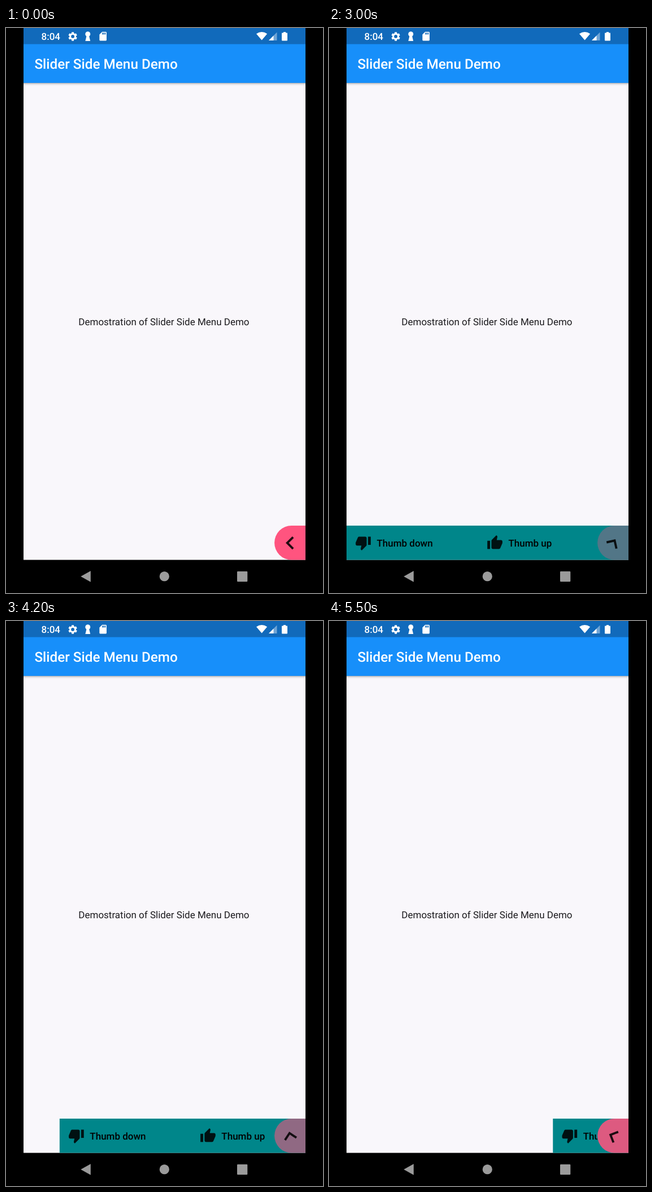
Write an HTML page that moves like this. It is 561 by 998 pixels and loops after 5.6 s.

```html
<!DOCTYPE html>
<html lang="en">
<head>
<meta charset="utf-8">
<title>Slider Side Menu Demo</title>
<style>
  html, body { margin: 0; width: 100%; height: 100%; overflow: hidden; background: #000; }
  svg { display: block; width: 100vw; height: 100vh; }
  text { font-family: Roboto, sans-serif; font-size: 17px; text-rendering: geometricPrecision; white-space: pre; }
  .medium { font-weight: 500; }
</style>
</head>
<body>
<svg viewBox="0 0 561 998">
  <defs>
    <linearGradient id="shade" x2="0" y2="1">
      <stop offset="0" stop-opacity=".3"/>
      <stop offset=".4" stop-opacity=".1"/>
      <stop offset="1" stop-opacity="0"/>
    </linearGradient>
    <clipPath id="items"><path d="M31 879H475V940H31z"/></clipPath>
  </defs>

  <rect width="561" height="998"/>
  <rect x="31" y="96" width="499" height="843.5" fill="#f9f7fb"/>
  <rect x="31" y="97" width="499" height="5" fill="url(#shade)"/>
  <rect x="31" y="28" width="499" height="69" fill="#178ffa"/>
  <rect x="31" width="499" height="28.5" fill="#116abb"/>

  <g fill="#fff">
    <text class="medium" x="62.5" y="21">8:04</text>
    <path id="gear" fill-rule="evenodd" transform="translate(108.4 5.2) scale(.81)" d="M19.14 12.94c.04-.3.06-.61.06-.94s-.02-.64-.07-.94l2.03-1.58a.5.5 0 0 0 .12-.61l-1.92-3.32a.5.5 0 0 0-.59-.22l-2.39.96a7 7 0 0 0-1.62-.94l-.36-2.54A.5.5 0 0 0 13.92 2.4h-3.84a.5.5 0 0 0-.47.41l-.36 2.54a7 7 0 0 0-1.62.94l-2.39-.96a.5.5 0 0 0-.59.22L2.74 8.87a.5.5 0 0 0 .12.61l2.03 1.58a6 6 0 0 0 0 1.88l-2.03 1.58a.5.5 0 0 0-.12.61l1.92 3.32c.12.22.37.29.59.22l2.39-.96c.5.38 1.03.7 1.62.94l.36 2.54c.05.24.24.41.48.41h3.84c.24 0 .44-.17.47-.41l.36-2.54a7 7 0 0 0 1.62-.94l2.39.96c.22.08.47 0 .59-.22l1.92-3.32a.5.5 0 0 0-.12-.61zM12 15.6a3.6 3.6 0 1 1 0-7.2 3.6 3.6 0 0 1 0 7.2z"/>
    <circle cx="144.8" cy="10.7" r="4.5"/>
    <path d="M142.8 13H146.8L149.2 23H140.4z"/>
    <path fill-rule="evenodd" transform="translate(162.2 5.2) scale(.79)" d="M18 2h-8L4.02 8 4 20c0 1.1.9 2 2 2h12c1.1 0 2-.9 2-2V4c0-1.1-.9-2-2-2zm-6 6h-2V4h2zm3 0h-2V4h2zm3 0h-2V4h2z"/>
    <path d="M452.6 21.5L443 10.2Q452.6 3.6 462.2 10.2z"/>
    <path d="M479.5 7.5V22H465z" opacity=".4"/>
    <path d="M473.5 13.5V22H465z"/>
    <path d="M491 7h4v1.6h2q1 0 1 1V21.4q0 1-1 1h-8q-1 0-1-1V9.6q0-1 1-1h2z"/>
    <text class="medium" x="50.4" y="72" style="font-size:24.3px">Slider Side Menu Demo</text>
  </g>

  <text x="128.3" y="525" fill="#1c1b1e">Demostration of Slider Side Menu Demo</text>

  <rect id="panel" y="879" height="60.5" fill="#00868a"/>
  <g clip-path="url(#items)">
    <g id="row">
      <path fill-opacity=".87" transform="translate(15 894.8) scale(1.213)" d="M15 3H6c-.83 0-1.54.5-1.84 1.22l-3.02 7.05c-.09.23-.14.47-.14.73v2c0 1.1.9 2 2 2h6.31l-.95 4.57-.03.32c0 .41.17.79.44 1.06L9.83 23l6.59-6.59c.36-.36.58-.86.58-1.41V5c0-1.1-.9-2-2-2zm4 0v12h4V3z"/>
      <text class="medium" x="53.5" y="915.6">Thumb down</text>
      <path fill-opacity=".87" transform="translate(248 894.8) scale(1.213)" d="M1 21h4V9H1zM23 10c0-1.1-.9-2-2-2h-6.31l.95-4.57.03-.32c0-.41-.17-.79-.44-1.06L14.17 1 7.59 7.59C7.22 7.95 7 8.45 7 9v10c0 1.1.9 2 2 2h9c.83 0 1.54-.5 1.84-1.22l3.02-7.05c.09-.23.14-.47.14-.73z"/>
      <text class="medium" x="286.5" y="915.6">Thumb up</text>
    </g>
  </g>
  <path id="button" fill="#ff547f" d="M530 879H505.3a30.25 30.25 0 0 0 0 60.5H530z"/>
  <path id="arrow" fill-opacity=".87" d="M3.41 -4.59L2 -6L-4 0L2 6L3.41 4.59L-1.17 0z"/>

  <g fill="#9b9b9b">
    <path d="M132.3 968.7L149.8 959V978.5z"/>
    <circle cx="280.3" cy="968.7" r="8.6"/>
    <rect x="409" y="959.7" width="18.3" height="18.3" rx="1.2"/>
  </g>
</svg>
<script>
  const LOOP = 5600, STEP = 100, SLIDE = 500;
  const LEFT = 31, RIGHT = 530;
  const FULL = 998; // wider than the screen, so the panel fills it halfway through
  const taps = [[1700, true], [2840, false], [3982, true], [5067, false]];
  const [panel, row, button, arrow] =
    ["panel", "row", "button", "arrow"].map(id => document.getElementById(id));

  function openness(time) {
    let value = 0;
    for (const [start, opening] of taps) {
      if (time < start) break;
      const p = Math.min(1, (time - start) / SLIDE);
      value = opening ? p : 1 - p;
    }
    return value;
  }

  function draw(time) {
    const open = openness(time);
    const width = Math.min(RIGHT - LEFT, FULL * open);
    panel.setAttribute("x", RIGHT - width);
    panel.setAttribute("width", width);
    row.setAttribute("transform", `translate(${RIGHT - width})`);
    button.setAttribute("fill-opacity", 1 - open);
    arrow.setAttribute("transform", `translate(502.8 909.6) rotate(${180 * open}) scale(1.95)`);
  }

  function tick() {
    const time = performance.now() % LOOP;
    draw(Math.floor((time + 1) / STEP) * STEP % LOOP);
    requestAnimationFrame(tick);
  }
  tick();
</script>
</body>
</html>
```
